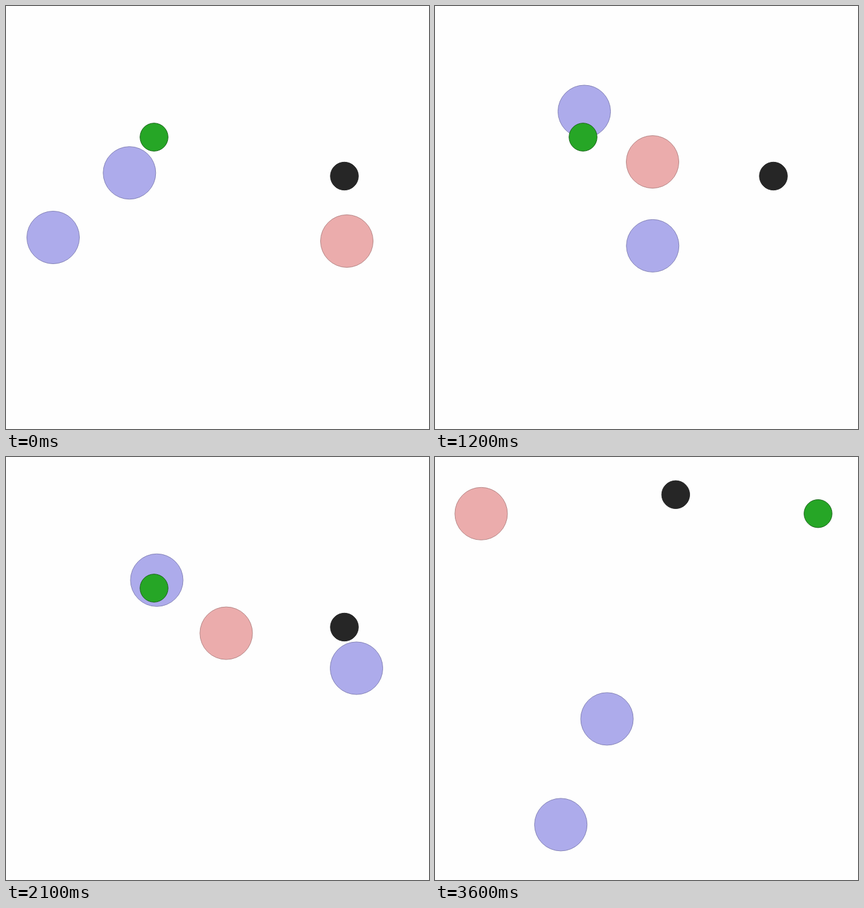
Animation, 700 px wide and 700 px high, one loop 3750 ms. Source, as an HTML page without scripts:

```html
<!DOCTYPE html>
<html lang="en">
<head>
<meta charset="utf-8">
<title>Circles</title>
<style>
  html, body { margin: 0; width: 100%; height: 100%; overflow: hidden; background: #fefefe; }
  svg { display: block; width: 100%; height: 100%; }

  .seeker { fill: #adabeb; stroke: #8483b6; r: 43.5px; }
  .drifter { fill: #ebacac; stroke: #b58686; r: 43.5px; }
  .green { fill: #26a626; stroke: #1b641b; r: 23.2px; }
  .black { fill: #262626; stroke: #262626; r: 23.2px; }

  /* The clock ticks every 150 ms, which is 4% of the loop.
     Bodies pass a few key points, with one step per tick between them. */
  .run, .reset, .run > [style] {
    animation: 3.75s -1ms steps(2) infinite;
  }
  .run { animation-name: show-first; }
  .reset { animation-name: show-last; }
  @keyframes show-first { 0%, 95.99% { visibility: visible } 96%, 100% { visibility: hidden } }
  @keyframes show-last { 0%, 95.99% { visibility: hidden } 96%, 100% { visibility: visible } }

  /* Sweeps right, then turns up and settles beside the black goal. */
  @keyframes cross {
    0% { translate: 78px 383px; animation-timing-function: steps(3) }
    12% { translate: 167px 393px; animation-timing-function: steps(3) }
    24% { translate: 274.7px 393.5px; animation-timing-function: steps(3) }
    36% { translate: 403px 398.5px; animation-timing-function: steps(3) }
    48% { translate: 536px 390.5px }
    56% { translate: 580px 349.5px; animation-timing-function: steps(3) }
    68% { translate: 604px 260px }
    76% { translate: 594px 242px }
    84% { translate: 585.5px 283.5px }
    92%, 100% { translate: 579px 308px }
  }

  /* Circles around the green goal. */
  @keyframes orbit {
    0% { translate: 204.3px 276.2px }
    8% { translate: 219px 269.5px; animation-timing-function: steps(3) }
    20% { translate: 285px 199.5px; animation-timing-function: steps(1) }
    24% { translate: 288.5px 187.5px }
    32% { translate: 247px 174.5px }
    40% { translate: 219px 201px }
    48% { translate: 235px 220px }
    56% { translate: 249.5px 203.8px; animation-timing-function: steps(3) }
    68% { translate: 218px 184.5px; animation-timing-function: steps(1) }
    72% { translate: 217px 183.5px; animation-timing-function: steps(3) }
    84% { translate: 253.4px 198.6px }
    92%, 100% { translate: 240px 205px }
  }

  /* Comes in from the right and swings back and down. */
  @keyframes drift {
    0% { translate: 564px 389px }
    8% { translate: 540px 376px; animation-timing-function: steps(4) }
    24% { translate: 427px 289.8px }
    32% { translate: 360px 258px }
    40% { translate: 323px 254.5px }
    48% { translate: 331px 268px }
    56% { translate: 364.4px 291.6px }
    64% { translate: 386px 339.5px; animation-timing-function: steps(1) }
    68% { translate: 388.8px 346.5px; animation-timing-function: steps(4) }
    84% { translate: 362.6px 308px }
    92%, 100% { translate: 357px 322.5px }
  }
</style>
</head>
<body>
<svg viewBox="0 0 700 700">
  <g class="run">
    <circle class="drifter" style="animation-name: drift"/>
    <circle class="seeker" style="animation-name: cross"/>
    <circle class="seeker" style="animation-name: orbit"/>
    <circle class="green" cx="245" cy="217"/>
    <circle class="black" cx="560" cy="281.5"/>
  </g>
  <g class="reset">
    <circle class="drifter" cx="76.4" cy="93.8"/>
    <circle class="seeker" cx="208.2" cy="608.4"/>
    <circle class="seeker" cx="284.6" cy="433.4"/>
    <circle class="green" cx="633.9" cy="93.7"/>
    <circle class="black" cx="398.3" cy="62.3"/>
  </g>
</svg>
</body>
</html>
```
